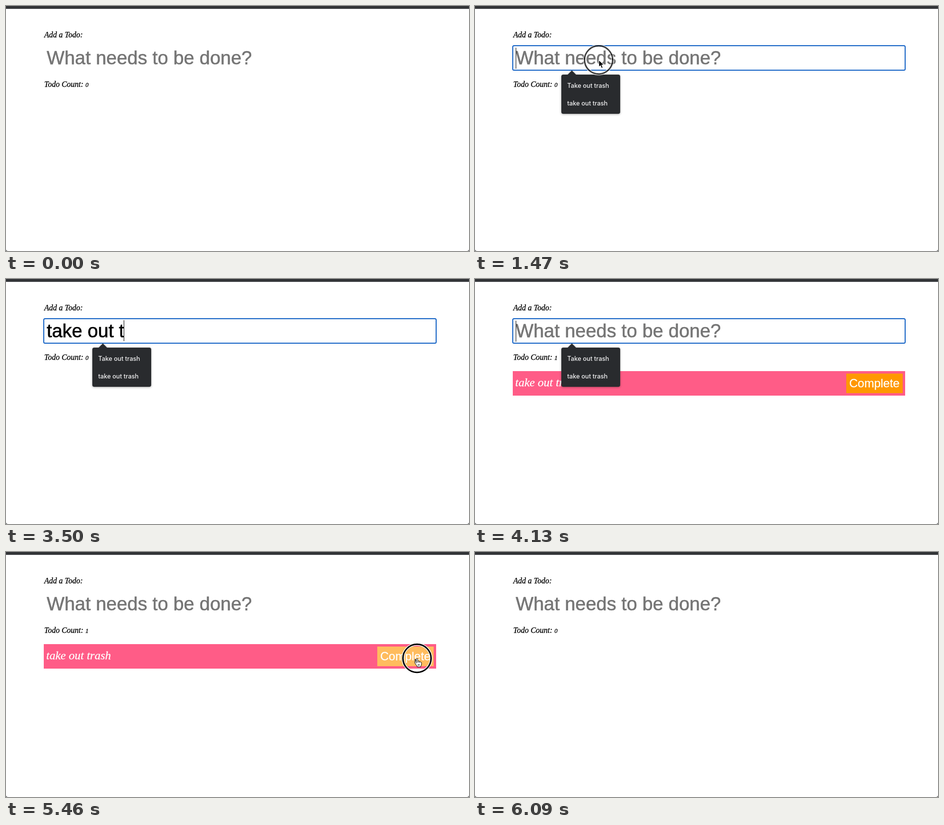
These frames come from a looping animation (944x500 px, 6510 ms). An HTML page:

```html
<!DOCTYPE html>
<html lang="en">
<head>
<meta charset="utf-8">
<title>Todo list</title>
<style>
  html, body { margin: 0; width: 100%; height: 100%; overflow: hidden; background: #fff; }
  svg { display: block; width: 944px; height: 500px; }
  text { white-space: pre; stroke: currentColor; fill: currentColor; stroke-width: .3; }
  .script { font: italic 16px "Liberation Serif", serif; }
  .digit { font-size: 12.5px; }
  .item { font-size: 24px; color: #fff; }
  .field { font: 38.4px "Liberation Sans", Arial, sans-serif; stroke-width: .6; }
  .button { font: 24px "Liberation Sans", Arial, sans-serif; color: #fff; }
  .hint { font: 500 12.6px Inter, sans-serif; color: #f1f1f2; stroke: none; }
  #popup { filter: drop-shadow(0 1px 2px rgba(0, 0, 0, .35)); }
</style>
</head>
<body>
<svg viewBox="0 0 944 500">
  <rect width="944" height="500" fill="#fff"/>
  <rect width="944" height="6" fill="#55575a"/>
  <rect width="944" height="5" fill="#323437"/>
  <path d="M0 496.5Q.5 499.5 3.5 500H0ZM944 496.5Q943.5 499.5 940.5 500H944Z" fill="#55575a"/>

  <text class="script" x="78" y="64">Add a Todo:</text>
  <text class="script" x="78" y="165">Todo Count: <tspan class="digit" id="count"></tspan></text>

  <rect id="focus" x="77" y="81" width="800" height="50" rx="2.5" fill="#fff" stroke="#1060c4" stroke-width="2"/>
  <text class="field" id="field" x="83" y="119"></text>
  <rect id="caret" width="1" height="43"/>

  <g id="todo">
    <rect x="77" y="188" width="800" height="50" fill="#ff5c87"/>
    <text class="script item" x="82" y="219">take out trash</text>
    <rect id="button" x="757" y="193" width="115" height="40"/>
    <text class="button" x="763" y="221">Complete</text>
  </g>

  <g id="popup">
    <path d="M188 141L197.5 131.5L207 141Z" fill="#292b2e"/>
    <rect x="176" y="140" width="120" height="80" rx="4" fill="#292b2e"/>
    <text class="hint" x="188" y="167">Take out trash</text>
    <text class="hint" x="188" y="203">take out trash</text>
  </g>

  <g id="mouse">
    <g id="ring" fill="none">
      <circle r="28.7" stroke="#fff" stroke-width="5.5"/>
      <circle r="28.7" stroke="#000" stroke-width="3"/>
    </g>
    <path id="arrow" d="M.5 .5V14.3L3.7 11.3L6 16.8L8.6 15.7L6.3 10.3H10.6Z"
      stroke="#fff" stroke-linejoin="round"/>
    <path id="hand" d="M-1.5 10V1.5Q0-1 1.5 1.5V6Q3.5 4.5 4.5 6.7Q6.5 5.5 7.2 8Q9 7.5 9.2 9.5V12L7.8 15.5V17.5H.2V16L-4.5 9.5Q-4-7-1.5 10ZM1.5 6V9M4.5 7V9M2.3 12V15M4.5 12V15"
      fill="#fff" stroke="#000" stroke-linejoin="round"/>
  </g>
</svg>
<script>
const LOOP = 6510, TICK = 70;
const TASK = "take out trash";
const FOCUS = 1260, TYPE = 2240, TYPED = 3920, SENT = 4130, PRESS = 5390, DONE = 5530;

const ENTRY = { x: 453, y: 357 };
const MOVES = [
  { from: 70, to: 210, x: 370, y: 152 },
  { from: 280, to: 560, x: 226, y: 90 },
  { from: 560, to: 700, x: 252, y: 110 },
  { from: 1750, to: 1960, x: 275, y: 110 },
  { from: 4270, to: 4970, x: 920, y: 226 },
  { from: 5110, to: PRESS, x: 838, y: 217 },
  { from: 5600, to: 6090, x: 540, y: 510 }
];

const $ = id => document.getElementById(id);
const show = (id, on) => $(id).setAttribute("visibility", on ? "inherit" : "hidden");
const within = (v, a, b) => v >= a && v < b;
const clamp = v => Math.max(0, Math.min(1, v));
const easeOut = k => 1 - (1 - k) ** 1.7;
const pen = document.createElement("canvas").getContext("2d");
pen.font = '38.4px "Liberation Sans", Arial, sans-serif';

function pointerAt(t) {
  return MOVES.reduce((p, m) => {
    const k = easeOut(clamp((t - m.from) / (m.to - m.from)));
    return { x: p.x + (m.x - p.x) * k, y: p.y + (m.y - p.y) * k };
  }, ENTRY);
}

// Typing starts slowly and speeds up.
function typedAt(t) {
  if (!within(t, TYPE, SENT)) return "";
  const k = clamp((t - TYPE) / (TYPED - TYPE));
  return TASK.slice(0, 1 + Math.floor((TASK.length - 1) * k ** 1.25));
}

// Full while pressed, then fades out.
function ringAlpha(t, start, hold, fade) {
  return t < start ? 0 : clamp(1 - (t - start - hold) / fade);
}

function drawField(t) {
  const typed = typedAt(t);
  const focused = within(t, FOCUS, PRESS);
  const blink = t < SENT ? t - 1320 : t - SENT;
  show("focus", focused);
  show("caret", focused && (typed || within(blink % 1000, 0, 500)));
  $("caret").setAttribute("x", Math.floor(83 + pen.measureText(typed).width));
  $("caret").setAttribute("y", typed ? 84 : 85);
  $("field").textContent = typed || "What needs to be done?";
  $("field").style.color = typed ? "#000" : "#757575";
}

function drawPointer(t, hasTodo) {
  const { x, y } = pointerAt(t);
  const over = hasTodo && within(x, 757, 872) && within(y, 193, 233);
  show("mouse", within(t, 70, TYPE) || within(t, 4340, 6090));
  $("mouse").setAttribute("transform", `translate(${x} ${y})`);
  $("ring").setAttribute("opacity", Math.max(
    ringAlpha(t, FOCUS, 140, 280), ringAlpha(t, PRESS, 70, 210)));
  show("arrow", !over);
  show("hand", over);
  $("button").setAttribute("fill", over ? "#ffbc5e" : "#ff9800");
}

function draw(time) {
  const t = Math.floor(time % LOOP / TICK) * TICK;
  const hasTodo = within(t, SENT, DONE);
  show("todo", hasTodo);
  show("popup", within(t, 1400, 4200));
  $("count").textContent = hasTodo ? 1 : 0;
  drawField(t);
  drawPointer(t, hasTodo);
}

const start = performance.now();
function frame() {
  draw(performance.now() - start);
  requestAnimationFrame(frame);
}
frame();
</script>
</body>
</html>
```
